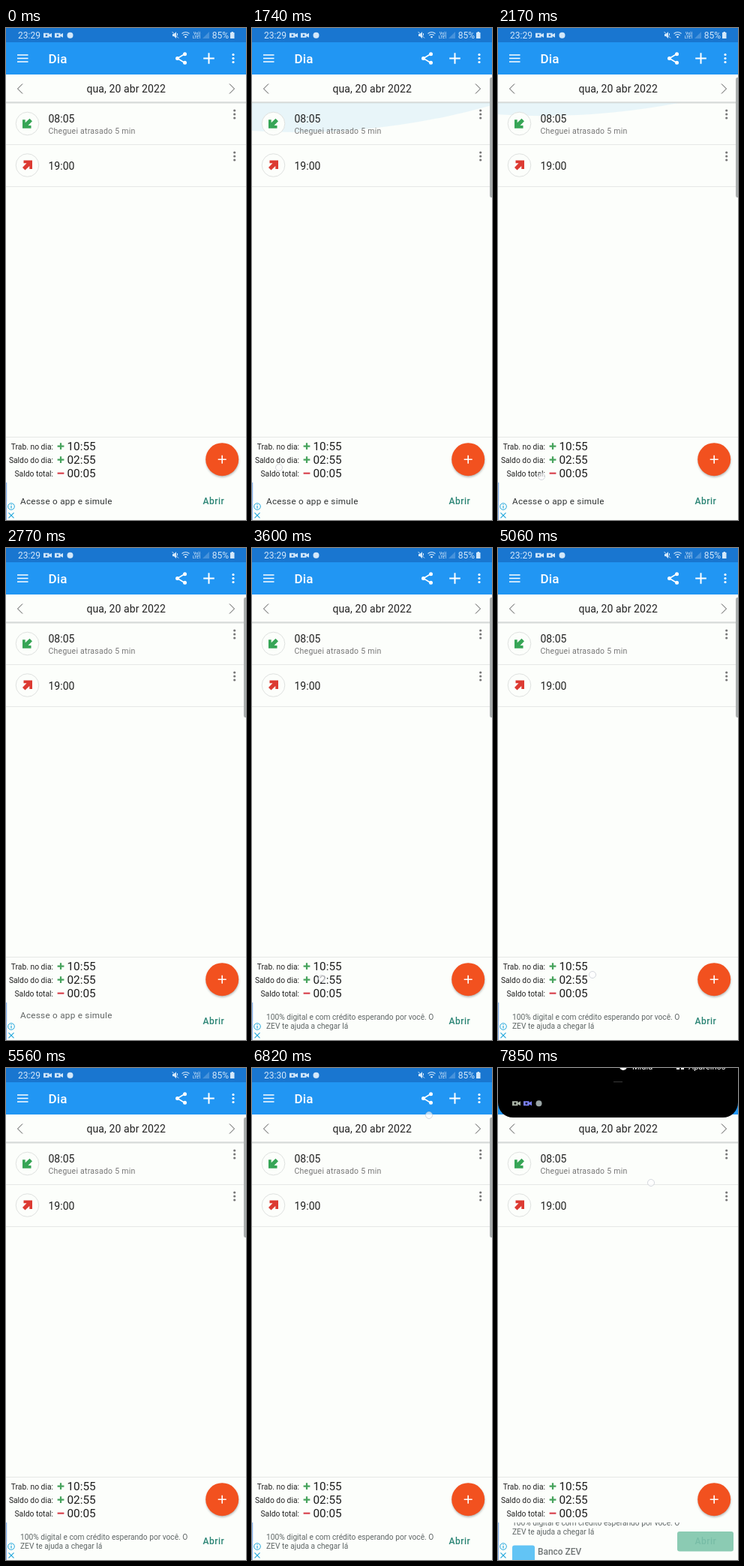
Animation of 320x656 px, one loop 7950 ms. Source, as an HTML page:

```html
<!DOCTYPE html>
<html lang="pt">
<head>
<meta charset="utf-8">
<title>Dia</title>
<style>
html, body { margin: 0; height: 100%; overflow: hidden; background: #fcfefb; }
svg { display: block; width: 100vw; height: 100vh; font-family: Roboto, sans-serif; }
.line { fill: none; stroke-width: 1; stroke: #e6e8e6; }
.label { font-size: 10.3px; text-anchor: end; fill: #222; }
.total { font-size: 15.3px; fill: #1c1c1c; }
.desc { font-size: 10.2px; fill: #5f6666; }
.open { font-size: 12px; font-weight: 500; letter-spacing: .5px; text-anchor: middle; }
</style>
</head>
<body>
<svg viewBox="0 0 320 656">
  <defs>
    <path id="arrow" d="M-6.5 6.5V-5H-2.800V-1L3-6.500L6.500-3L1 2.800H5V6.500Z"/>
    <path id="plus" d="M-1 0H1M0-1V1" vector-effect="non-scaling-stroke"/>
    <path id="cam" d="M-5.5-3H2V-1L5.5-3V3L2 1V3H-5.5ZM-2.8-1.2V1.2H-.3V-1.2Z" fill-rule="evenodd"/>
    <g id="dots"><circle cy="-5" r="1.600"/><circle r="1.600"/><circle cy="5" r="1.600"/></g>
    <linearGradient id="shadow" x2="0" y2="1">
      <stop stop-color="#c4c8c8"/><stop offset="1" stop-color="#c4c8c8" stop-opacity="0"/>
    </linearGradient>
    <filter id="blur" x="-30%" y="-30%" width="160%" height="160%"><feGaussianBlur stdDeviation="1.5"/></filter>
    <clipPath id="list"><path d="M0 100H320V545H0Z"/></clipPath>
    <clipPath id="banner"><path d="M0 606H320V656H0Z"/></clipPath>
  </defs>
  <rect width="320" height="656" fill="#fcfefb"/>

  <!-- status bar and toolbar -->
  <rect width="320" height="62" fill="#2196f3"/>
  <rect width="320" height="19" fill="#1976d0"/>
  <g fill="#d3e8fa" font-size="12">
    <text id="clock" x="16" y="14.2">23:29</text>
    <use href="#cam" x="55.5" y="9.7"/><use href="#cam" x="70.5" y="9.7"/>
    <circle cx="85.5" cy="9.7" r="4"/>
    <path d="M222 8H224L227 5V14L224 11H222Z"/>
    <path d="M221.5 5L230 13.5M228.5 7V10" stroke="#d3e8fa" fill="none"/>
    <path d="M234.5 7.5Q239.5 3.5 244.5 7.5M236.3 9.7Q239.5 7.2 242.7 9.7" stroke="#d3e8fa" stroke-width="1.1" fill="none"/>
    <circle cx="239.5" cy="12" r="1.3"/>
    <g font-size="5" font-weight="500"><text x="250" y="8.7">Vo))</text><text x="249" y="14">LTE1</text></g>
    <path d="M262 14L271 5V14Z" opacity=".25"/>
    <text x="274.7" y="14.2">85%</text>
    <path d="M299 6H300.5V5H303V6H304.5V14H299Z"/>
  </g>
  <g stroke="#fff" fill="none" stroke-width="1.6">
    <path d="M15 36H29.5M15 40.5H29.5M15 45H29.5M238.5 34.5L228.5 40.5L238.5 46.5"/>
    <use href="#plus" transform="translate(270.5 40.5) scale(7.3)" stroke-width="2"/>
  </g>
  <g fill="#fff">
    <circle cx="228.5" cy="40.5" r="2.5"/><circle cx="238.5" cy="34.7" r="2.5"/><circle cx="238.5" cy="46.3" r="2.5"/>
    <use href="#dots" x="303" y="40.5"/>
    <text x="56.5" y="47" font-size="17" font-weight="500" letter-spacing=".1">Dia</text>
  </g>

  <!-- date header -->
  <path d="M22 74.5L15.5 81L22 87.5M298 74.5L304.5 81L298 87.5" fill="none" stroke="#555" stroke-width="1"/>
  <text x="107.5" y="86" font-size="14" letter-spacing=".1" fill="#222">qua, 20 abr 2022</text>
  <rect y="98.5" width="320" height="3" fill="url(#shadow)"/>

  <!-- entries -->
  <g clip-path="url(#list)"><circle id="glow" cx="60" r="957" fill="#d5edf8" opacity=".5"/></g>
  <path class="line" d="M0 155.5H320M0 211.5H320M0 545.5H320"/>
  <g fill="#fcfefb" stroke="#dfe2e0"><circle cx="28.5" cy="127.5" r="15.3"/><circle cx="28.5" cy="183" r="15.3"/></g>
  <use href="#arrow" x="28.5" y="127.3" fill="#36a556"/>
  <use href="#arrow" transform="translate(28.5 183) rotate(180)" fill="#dc3a32"/>
  <g font-size="14" fill="#222"><text x="56.5" y="126">08:05</text><text x="56.5" y="188.5">19:00</text></g>
  <text x="56.5" y="140.5" font-size="10.5" letter-spacing=".25" fill="#777">Cheguei atrasado 5 min</text>
  <g fill="#777"><use href="#dots" x="304.7" y="115"/><use href="#dots" x="304.7" y="171"/></g>
  <path id="handle" d="M320 66H319Q317 66 317 69V223Q317 226 319 226H320Z" fill="#a9adad"/>

  <!-- totals -->
  <g class="label"><text x="63" y="561.5">Trab. no dia:</text><text x="63" y="579.5">Saldo do dia:</text><text x="63" y="597.5">Saldo total:</text></g>
  <g class="total"><text x="81.5" y="563">10:55</text><text x="81.5" y="581">02:55</text><text x="81.5" y="599">00:05</text></g>
  <g stroke="#46a35c" stroke-width="2.2">
    <use href="#plus" transform="translate(73 557.7) scale(4.4)"/>
    <use href="#plus" transform="translate(73 575.7) scale(4.4)"/>
    <path d="M68.6 593.7H77.4" stroke="#d8434f"/>
  </g>
  <circle cx="288.5" cy="577" r="21.7" fill="#555" opacity=".45" filter="url(#blur)"/>
  <circle cx="288.2" cy="575.2" r="22" fill="#f2511f"/>
  <use href="#plus" transform="translate(288.2 575.2) scale(5.5)" stroke="#fff" stroke-width="1.6"/>

  <!-- banner -->
  <g clip-path="url(#banner)">
    <text id="ad1" x="19" y="635.3" font-size="11.7" letter-spacing=".28" fill="#2f3333">Acesse o app e simule</text>
    <g id="ad2">
      <text class="desc" x="19" y="628.5">100% digital e com crédito esperando por você. O</text>
      <text class="desc" x="19" y="640.5">ZEV te ajuda a chegar lá</text>
      <g id="brand">
        <rect x="19" y="655" width="30" height="30" rx="3" fill="#62c4f5"/>
        <text x="53" y="667" font-size="11.9" font-weight="500" fill="#6f7575">Banco ZEV</text>
      </g>
    </g>
    <rect id="button" x="239" y="618" width="75" height="26.5" rx="3" fill="#8bcbb3"/>
    <text id="open" class="open" x="276.8" y="635.3" fill="#2a8474">Abrir</text>
    <path d="M.6 606V656" stroke="#8ab4ee" stroke-width="1.2"/>
    <rect x="1.2" y="631" width="12" height="25" fill="#fcfefb"/>
    <g stroke="#22a7dc" fill="none"><circle cx="7" cy="638" r="4.3"/><path d="M7 637V640.5M7 635V636M3.5 646.3L10.5 653.3M10.5 646.3L3.5 653.3" stroke-width="1.2"/></g>
  </g>

  <!-- notification shade, at its lowest place -->
  <g id="shade">
    <path d="M0-66H320V46A20 20 0 0 1 300 66H20A20 20 0 0 1 0 46Z" fill="#000"/>
    <g fill="#fff" font-size="11"><circle cx="167" cy="-2" r="5"/><text x="179" y="2">Mídia</text>
      <path d="M238-7H242V-3H238ZM244-7H248V-3H244ZM238-2H242V2H238ZM244-2H248V2H244Z"/><text x="254" y="2">Aparelhos</text></g>
    <path d="M154 18.5H166" stroke="#3a3a3a"/>
    <use href="#cam" x="24.5" y="47.3" fill="#a9b3a6"/><use href="#cam" x="39.5" y="47.3" fill="#7a80f2"/>
    <circle cx="54.5" cy="47.3" r="4" fill="#9aa5a5"/>
  </g>
  <circle id="touch" r="4.5" fill="#fff" fill-opacity=".65" stroke="#c3c8d2" stroke-opacity=".7"/>
</svg>
<script>
const LOOP = 7950;
const $ = id => document.getElementById(id);
const set = (id, name, value) => $(id).setAttribute(name, value);
const ramp = (t, a, b) => Math.min(1, Math.max(0, (t - a) / (b - a)));
const smooth = u => u * u * (3 - 2 * u);
const show = (id, on) => set(id, 'visibility', on ? 'visible' : 'hidden');
const shift = (id, y) => set(id, 'transform', `translate(0 ${y})`);

// touches: lists of [time, x, y]
const touches = [
  [[1420, 44, 545], [1740, 36, 586], [2170, 58, 598], [2450, 70, 600]],
  [[3100, 62, 582], [3600, 93, 574], [4200, 112, 585], [5060, 126, 569], [5460, 128, 564]],
  [[6820, 236, 63], [7140, 236, 63]],
  [[7720, 212, 45], [7850, 204, 153], [LOOP, 204, 153]]
];

function touchAt(t) {
  const path = touches.find(p => t >= p[0][0] && t < p[p.length - 1][0]);
  if (!path) return null;
  const i = path.findIndex(p => p[0] > t), [a, b] = [path[i - 1], path[i]];
  const u = ramp(t, a[0], b[0]);
  return [a[1] + (b[1] - a[1]) * u, a[2] + (b[2] - a[2]) * u];
}

function draw(t) {
  $('clock').textContent = t < 6160 ? '23:29' : '23:30';
  show('handle', t >= 200 && t < 7720);

  const pull = smooth(ramp(t, 1420, 1740)) * (1 - smooth(ramp(t, 1900, 2400)));
  set('glow', 'cy', 100 + 39 * pull - 957);
  show('glow', pull > 0);

  const slide = smooth(ramp(t, 2630, 3190)), grow = t < 7720 ? 0 : ramp(t, 7660, 7850);
  shift('ad1', -50 * slide);
  set('ad1', 'opacity', 1 - Math.min(1, 1.5 * slide));
  shift('ad2', 50 * (1 - slide) - 18.5 * grow);
  set('brand', 'opacity', grow);
  set('button', 'opacity', grow);
  set('open', 'opacity', 1 - .8 * grow);

  show('shade', grow > 0);
  shift('shade', 66 * (grow - 1));

  const p = touchAt(t);
  show('touch', p);
  if (p) set('touch', 'transform', `translate(${p})`);
}

let start;
function frame(now) {
  start ??= now;
  draw((now - start) % LOOP);
  requestAnimationFrame(frame);
}
draw(0);
requestAnimationFrame(frame);
</script>
</body>
</html>
```
